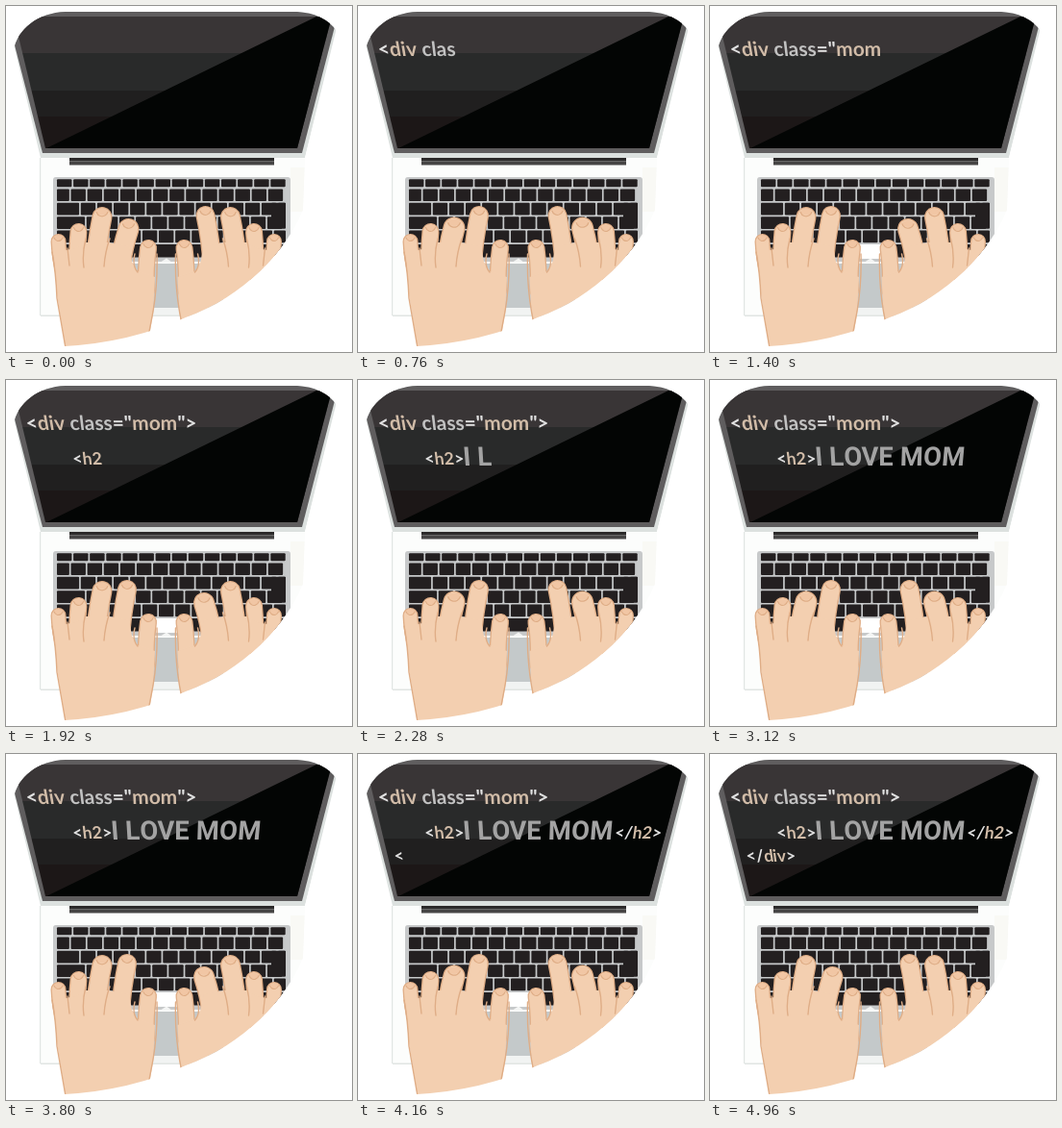
An HTML page with a canvas that plays this animation: 360x360 px, repeating every 5000 ms.

```html
<!DOCTYPE html>
<html lang="en">
<head>
<meta charset="utf-8">
<title>Typing hands</title>
<style>
html, body { margin: 0; width: 100%; height: 100%; overflow: hidden; background: #fff; }
canvas { display: block; width: 360px; height: 360px; }
</style>
</head>
<body>
<canvas id="stage" width="360" height="360"></canvas>
<script>
const g = document.getElementById('stage').getContext('2d');
const LOOP = 5000, BEAT = 490, STEP = 40;
const SKIN = '#f3cfb0', EDGE = '#dfad86', KEY = '#231f20', TAN = '#d1bca8';
const tint = { div: TAN, h2: TAN, mom: TAN, class: '#c2c2c2' };

const lines = [
  { text: '<div class="mom">', x: 22, y: 52, font: '20.8px Lato' },
  { text: '<h2>', x: 70, y: 88, font: '17.8px Lato' },
  { text: 'I LOVE MOM', x: 110, y: 89, font: '27.4px Roboto' },
  { text: '</h2>', x: 266.5, y: 88, font: '17.6px Lato' },
  { text: '</div>', x: 38.5, y: 112, font: '17.6px Lato' }
];

// Types up to the end of the headline, rests, then closes the tags.
function typed(t) {
  const opening = t < 80 ? 0 : Math.min(31, Math.floor(t / 100 + 1.6));
  const closing = Math.min(11, Math.max(0, Math.floor((t - 3740) / 65)));
  return opening + closing;
}

function poly(points, fill) {
  g.beginPath();
  points.forEach(p => g.lineTo(...p));
  g.fillStyle = fill;
  g.fill();
}

function box(x, y, w, h, fill, r = 0) {
  g.beginPath();
  g.roundRect(x, y, w, h, r);
  g.fillStyle = fill;
  g.fill();
}

function clipStage() {
  g.clip(new Path2D('M62 6 H303 C321 7 336 14 344 26 L311 158 L309 212 ' +
    'C293 253 247 303 187 324 Q130 350 61 354 L35 323 V158 L8 46 C12 24 33 7 62 6 Z'));
}

function screen() {
  poly([[0, 6], [348, 6], [311, 158], [36, 158]], '#dce1df');
  poly([[0, 6], [346, 6], [308, 153], [38, 153]], '#5f5d5e');
  g.save();
  g.clip(new Path2D('M8 11 H339 L303 148 H41 Z'));
  box(0, 11, 345, 38, '#393536');
  box(0, 49, 345, 39, '#292a2a');
  box(0, 88, 345, 27, '#201f1f');
  box(0, 115, 345, 35, '#1c1717');
  poly([[323, 11], [345, 11], [345, 150], [38, 150]], '#030504');
  g.restore();
}

function keys() {
  const left = 53, right = 291, unit = 17.1, gap = 1.7;
  const key = (x, y, end, h) => box(x, y, end - x - gap, h, KEY, 1);
  // width of each row's first key, in units
  [1, 0.85, 1.45, 1.8, 2.2, 1.2].forEach((first, row) => {
    const y = row ? 176 + row * 14.4 : 180.3;
    const h = row ? 12.7 : 8;
    let x = left, end = left + first * unit;
    while (x < right - 5) {
      key(x, y, Math.min(end, right + gap), h);
      x = end;
      end += unit;
    }
  });
  box(276, 204.8, 15, 27, KEY, 1);
  box(122, 248, 92, 13.5, KEY, 1);
}

function base(pressed) {
  box(35, 158, 276, 165, '#fcfdfc');
  box(35, 158, 1.2, 164, '#e1e5e3');
  box(296, 168, 15, 46, '#f9f9f5');
  box(66, 157.5, 213, 4, '#2b2a2a');
  box(66, 161.5, 213, 4, '#464545');
  box(49, 178, 247, 88, '#c7c9ca', 3);
  keys();
  if (pressed) box(156, 248, 24, 15, '#fff');
  poly([[160, 267], [167, 262.5], [173, 267]], '#f4f5f4');
  box(118, 268, 108, 46, '#c4c9ca', 2);
  box(118, 314, 108, 8, '#f1f3f2');
  box(36, 321.5, 160, 1.5, '#e1e5e3');
}

function finger(tipX, tipY, rootX, rootY, r) {
  const shape = new Path2D(`M${tipX} ${tipY} Q${(tipX + rootX) / 2 - 2} ${(tipY + rootY) / 2} ${rootX} ${rootY}`);
  g.lineCap = 'round';
  [[EDGE, 2 * r], [SKIN, 2 * r - 2.6]].forEach(([color, width]) => {
    g.strokeStyle = color;
    g.lineWidth = width;
    g.stroke(shape);
  });
  g.beginPath();
  g.ellipse(tipX, tipY - r * 0.5, r * 0.55, r * 0.3, 0, 0, Math.PI * 2);
  g.fillStyle = '#f1c6a4';
  g.fill();
  g.beginPath();
  g.arc(tipX, tipY - r * 0.65, r * 0.58, 0.3, Math.PI - 0.3);
  g.strokeStyle = EDGE;
  g.lineWidth = 1.2;
  g.stroke();
}

const palm = new Path2D('M50 262 L62 254 L72 252 L83 246 L106 246 L128 250 L131 266 ' +
  'L137 276 L155 282 L153 320 L148 350 L62 358 L53 300 Z');
const creases = new Path2D('M48 256 Q52 278 53 304 L62 356 M157 258 Q158 288 153 318 L148 344 ' +
  'M64 252 L66 270 M83 242 Q79 258 81 272 M108 242 Q103 256 102 271 M134 258 Q131 270 137 277');

function hand(midDown, indexDown) {
  finger(54.5, 245, 60, 280, 8);
  finger(75.5, 235, 75, 278, 9);
  finger(100, midDown ? 231 : 219.5, 93, 272, midDown ? 11.5 : 10.5);
  finger(indexDown ? 127.5 : 126, indexDown ? 232 : 218, 119, 270, indexDown ? 11 : 10);
  finger(148, 252, 146, 296, 9);
  g.fillStyle = SKIN;
  g.fill(palm);
  g.strokeStyle = EDGE;
  g.lineWidth = 1.4;
  g.stroke(creases);
}

function mirrored(paint) {
  g.save();
  g.translate(333.5, 0);
  g.scale(-1, 1);
  paint();
  g.restore();
}

// Letters lean outwards with the sides of the screen.
function letter(char, x, y) {
  g.save();
  g.transform(1, 0, (172 - x) * 0.0013, 1, x, y);
  g.fillText(char, 0, 0);
  g.restore();
}

function write(count) {
  for (const { text, x, y, font } of lines) {
    g.font = `bold ${font}, sans-serif`;
    for (const { 0: word, index } of text.matchAll(/\w+|\W+/g)) {
      g.fillStyle = tint[word] || (/[A-Z]/.test(word) ? '#a3a3a3' : '#e2e2e2');
      for (let i = index; i < Math.min(index + word.length, count); i++) {
        letter(text[i], x + g.measureText(text.slice(0, i)).width, y);
      }
    }
    count -= text.length;
  }
}

function draw(t) {
  const resting = t >= 3480 && t < 3800;
  const phase = (resting ? 3480 : t) % BEAT / BEAT;
  const pose = Math.floor(phase * 3);
  g.clearRect(0, 0, 360, 360);
  g.save();
  clipStage();
  base(pose === 2 || (pose === 1 && phase < 0.52));
  screen();
  write(typed(t));
  hand(pose === 1, pose === 0);
  mirrored(() => hand(pose === 1, pose === 2));
  g.restore();
}

const begin = performance.now();
function tick() {
  const t = (performance.now() - begin) % LOOP;
  draw(Math.floor(t / STEP) * STEP);
  requestAnimationFrame(tick);
}
tick();
</script>
</body>
</html>
```
